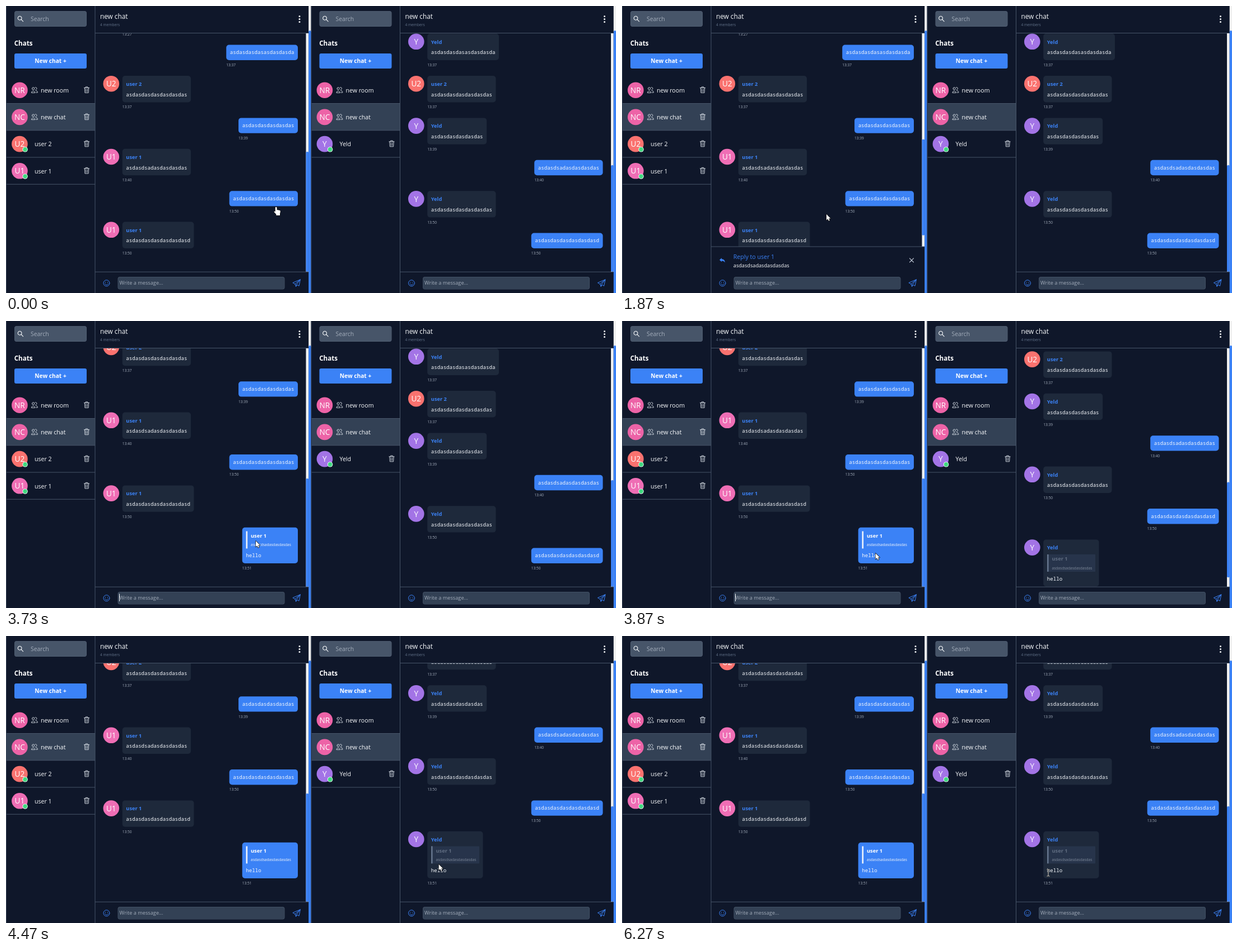
Write an HTML page with a canvas that moves like this. It is 1089 px wide and 514 px high and loops after 6390 ms.

```html
<!DOCTYPE html>
<html lang="en">
<head>
<meta charset="utf-8">
<title>Chat reply</title>
<style>
html, body { margin: 0; width: 100%; height: 100%; overflow: hidden; background: #0f172a; }
canvas { display: block; width: 1089px; height: 514px; }
</style>
</head>
<body>
<canvas id="stage"></canvas>
<script>
const W = 1089, H = 514, LOOP = 6390, FPS = 15;
const canvas = document.getElementById('stage');
const ctx = canvas.getContext('2d');
const dpr = window.devicePixelRatio || 1;
canvas.width = Math.round(W * dpr);
canvas.height = Math.round(H * dpr);

const SANS = '"Open Sans", "Noto Sans", sans-serif';
const MONO = '"Noto Sans Mono", "DejaVu Sans Mono", monospace';
const BG = '#0f172a', LINE = '#475569', ROW = '#334155', CARD = '#1e293b';
const BLUE = '#3b82f6', WHITE = '#f8fafc', MUTED = '#a3adbb', TRACK = '#f1f1f1';
const TOP = 49, BOTTOM = 476, PANEL = 431;

const people = {
  me: { name: 'Yeld', tag: 'Y', color: '#a374e6' },
  u1: { name: 'user 1', tag: 'U1', color: '#ef6eb5' },
  u2: { name: 'user 2', tag: 'U2', color: '#fa726f' }
};
const QUOTE = 'asdasdsadasdasdasdas';
const history = [
  { by: 'u2', text: 'asdasdas', time: '13:27' },
  { by: 'me', text: 'asdasdasdasasdasdasda', time: '13:37' },
  { by: 'u2', text: 'asdasdasdasdasdasdas', time: '13:37' },
  { by: 'me', text: 'asdasdasdasdasdas', time: '13:39' },
  { by: 'u1', text: QUOTE, time: '13:40' },
  { by: 'me', text: 'asdasdasdasdasdasdas', time: '13:50' },
  { by: 'u1', text: 'asdasdasdasdasdasdasd', time: '13:50' }
];
const answer = { by: 'me', text: 'hello', time: '13:51', quote: true };

// Pointer path: time, x, y
const path = [
  [0, 482, 360], [67, 482, 360], [267, 288, 281], [600, 288, 281],
  [1067, 323, 297], [1267, 323, 297], [1600, 365, 373], [3200, 365, 373],
  [3333, 323, 348], [3400, 323, 348], [3733, 446, 394], [3933, 456, 427],
  [4133, 458, 428], [4467, 773, 409], [4600, 836, 402], [4800, 778, 420],
  [5000, 761, 424], [LOOP, 761, 424]
];
const letters = [2000, 2070, 2200, 2330, 2470];
const blinks = [1330, 1870, 2000, 3000, 3530, 4070, 4600, 5200, 5730, 6270];

function rect(x, y, w, h, fill, r = 0) {
  ctx.fillStyle = fill;
  ctx.beginPath();
  ctx.roundRect(x, y, w, h, r);
  ctx.fill();
}

function disc(x, y, r, fill) {
  ctx.fillStyle = fill;
  ctx.beginPath();
  ctx.arc(x, y, r, 0, Math.PI * 2);
  ctx.fill();
}

// y is the middle of the capital letters
function text(s, x, y, size, fill = WHITE, weight = 400, family = SANS, align = 'left') {
  ctx.font = `${weight} ${size}px ${family}`;
  ctx.textAlign = align;
  ctx.fillStyle = fill;
  ctx.fillText(s, x, y + size * 0.36);
}

function icon(d, x, y, color, width = 1, filled = false) {
  ctx.save();
  ctx.translate(x, y);
  const p = new Path2D(d);
  ctx.lineJoin = ctx.lineCap = 'round';
  ctx.lineWidth = width;
  ctx.strokeStyle = ctx.fillStyle = color;
  if (filled) ctx.fill(p); else ctx.stroke(p);
  ctx.restore();
}

const ICONS = {
  search: 'M2 -1.3A3.4 3.4 0 1 1 -4.8 -1.3A3.4 3.4 0 1 1 2 -1.3M1.1 1.2L4.6 4.7',
  group: 'M-4.4 -2.6a2 2.2 0 1 1 4 0a2 2.2 0 1 1 -4 0M-5.6 4.5C-5.6 .8 .8 .8 .8 4.5Z' +
    'M.8 -4.5a2 2.2 0 1 1 1 4M2.2 1C4.3 1 5.4 2.4 5.4 4.5H2.6',
  trash: 'M-4.6 -3.6H4.6M-1.8 -3.6V-5.3H1.8V-3.6M-3.7 -3.6L-3.1 5.3H3.1L3.7 -3.6M-1.4 -1.5L-1.2 3.4M1.4 -1.5L1.2 3.4',
  smile: 'M5.5 0A5.5 5.5 0 1 1 -5.5 0A5.5 5.5 0 1 1 5.5 0M-2.9 1.2C-1.8 3.8 1.8 3.8 2.9 1.2M-2 -1.8V-1.2M2 -1.8V-1.2',
  send: 'M6.6 -6.3L-6.6 -.6L-2.4 1.7L-.9 6L1.3 3.2L4.2 4.8ZM6.6 -6.3L-2.4 1.7M6.6 -6.3L.2 2.6L-.9 6',
  reply: 'M-5 -.7L-1 -4.2V-2.2C3 -2 4.7 0 4.8 4C3.5 1.5 2 .8 -1 .9V2.8Z',
  clip: 'M-4.3 -4H-2V-5.4H2V-4H4.3V5.4H-4.3ZM-2 -4V-2.8H2V-4',
  cross: 'M-3.5 -3.5L3.5 3.5M3.5 -3.5L-3.5 3.5'
};

function avatar(x, y, tag, color, online) {
  disc(x, y, 14.3, color);
  text(tag, x, y + 0.3, 13.6, '#fff', 500, SANS, 'center');
  if (online) {
    disc(x + 9.7, y + 9.8, 4.7, '#fff');
    disc(x + 9.7, y + 9.8, 3.8, '#3fd97f');
  }
}

function sidebar(rows) {
  rect(0, 0, 1, H, '#3b475a');
  rect(15, 9, 129, 28, '#566377', 4);
  rect(15.6, 9.6, 127.8, 26.8, LINE, 3.5);
  icon(ICONS.search, 26, 23, WHITE, 1.1);
  text('Search', 44, 23.2, 10.4, MUTED);
  text('Chats', 14.7, 67, 11.6, '#fff', 700);
  rect(15, 85, 129, 27, BLUE, 3);
  text('New chat +', 79.5, 98.8, 10.2, '#fff', 700, SANS, 'center');
  rows.forEach((r, i) => {
    const top = 126.4 + i * 48.2, mid = top + 24.3;
    if (r.active) rect(1, top, 158, 48.2, ROW);
  });
  rows.forEach((r, i) => {
    const top = 126.4 + i * 48.2, mid = top + 24.3;
    rect(1, top + 47.7, 158, 1, LINE);
    avatar(24.4, mid, r.tag, r.color, !r.room);
    if (r.room) icon(ICONS.group, 51, mid - 0.2, '#dbe1e9', 0.9);
    text(r.name, r.room ? 62 : 51, mid + 0.4, 10.6);
    if (r.bin) icon(ICONS.trash, 144, mid - 0.6, '#dbe1e9', 0.9);
  });
  rect(158.5, 0, 1, H, LINE);
}

function quoteBox(x, y, own) {
  if (!own) rect(x, y, 86, 31, '#27344b', 1);
  rect(x, y, 2.6, 31, own ? '#eef3fb' : '#64748b');
  text('user 1', x + 8.5, y + 8, 9.3, own ? '#fff' : '#5f6c80', 700);
  text(QUOTE, x + 8.5, y + 24.2, 6.6, own ? '#f1f5f9' : '#7f8a9b');
}

function bubble(m, top, own) {
  const pad = own ? 0 : 20, h = boxHeight(m, own);
  ctx.font = `400 9.11px ${MONO}`;
  const w = m.quote ? 99.3 : ctx.measureText(m.text).width + 13.2;
  const x = own ? 521 - w : 207.7;
  rect(x, top, w, h, own ? BLUE : CARD, 5);
  if (!own) {
    const p = people[m.by];
    avatar(187.8, top + 14.2, p.tag, p.color);
    text(p.name, x + 6.6, top + 14.6, 9.25, BLUE, 700);
  }
  if (m.quote) quoteBox(x + 6.8, top + 6.6 + pad, own);
  text(m.text, x + 6.6, top + h - 13.8, 9.11, '#f4f7fb', 400, MONO);
  text(m.time, x, top + h + 8.6, 6.6, MUTED);
}

function boxHeight(m, own) {
  return 27.4 + (own ? 0 : 20) + (m.quote ? 36.8 : 0);
}

function feed(list, self, lag, bottom) {
  ctx.save();
  ctx.beginPath();
  ctx.rect(159.5, TOP, 376, bottom - TOP);
  ctx.clip();
  let y = 462 + lag;
  for (let i = list.length - 1; i >= 0 && y > TOP - 20; i--) {
    const own = list[i].by === self;
    y -= boxHeight(list[i], own) + 28;
    bubble(list[i], y, own);
  }
  ctx.restore();
}

function scrollbar(content, lag, bottom) {
  const view = bottom - TOP;
  const scroll = content - (BOTTOM - TOP) - lag;
  rect(535.5, TOP, 4.7, view, TRACK);
  rect(535.5, TOP + scroll / content * view, 4.7, view * view / content, BLUE, 2);
}

function header() {
  text('new chat', 168, 19, 11.8);
  text('4 members', 168, 33.6, 6.6, '#64748b');
  for (let i = 0; i < 3; i++) disc(524, 18.6 + i * 5, 1.5, WHITE);
  rect(159, 48, 381, 1, LINE);
}

function composer(typed, caret, replying) {
  if (!replying) rect(159, 475.7, 381, 1, LINE);
  icon(ICONS.smile, 179.5, 496.3, BLUE, 1);
  rect(199.5, 485, 298, 22.6, LINE, 4);
  rect(200.2, 485.7, 296.6, 21.2, ROW, 3.5);
  text(typed || 'Write a message...', 202.5, 495.8, 9.2, typed ? WHITE : MUTED);
  if (caret) {
    const x = typed ? 202.5 + ctx.measureText(typed).width : 202;
    rect(x, 488.5, 1, 13.5, WHITE);
  }
  icon(ICONS.send, 518.5, 496.3, BLUE, 1);
}

function replyPanel() {
  rect(159, PANEL - 0.5, 381, 1, LINE);
  icon(ICONS.reply, 179, 455.5, BLUE, 1, true);
  text('Reply to user 1', 198.8, 449, 10.6, BLUE);
  text(QUOTE, 198.8, 464.6, 9.17);
  icon(ICONS.cross, 517, 455.3, '#cbd5e1', 1.1);
}

function menu(hover) {
  rect(287.4, 280.8, 117.6, 48.4, '#2b3566', 1);
  rect(288.2, 281.6, 116, 46.8, '#11164a');
  if (hover) rect(288.2, 281.6, 116, 23, '#272b54');
  icon(ICONS.reply, 302, 293, '#b9c0d0', 1, true);
  text('Reply', 315, 293.6, 9.4, '#cfd5e2');
  icon(ICONS.clip, 302, 316.5, '#b9c0d0', 0.9);
  text('Copy To Clipboard', 315, 317, 9.4, '#cfd5e2');
}

function pointAt(t) {
  const i = Math.max(1, path.findIndex(p => p[0] >= t));
  const [t0, x0, y0] = path[i - 1], [t1, x1, y1] = path[i];
  const k = Math.min(1, Math.max(0, (t - t0) / (t1 - t0)));
  return [x0 + (x1 - x0) * k, y0 + (y1 - y0) * k];
}

function pointer(x, y, kind) {
  const shapes = {
    arrow: 'M0 0V10.4L2.4 8.2L4 11.8L5.8 11L4.2 7.5H7.4Z',
    hand: 'M0 0C1.2 -.2 1.6 .6 1.6 1.6V5L6.4 6C7.6 6.4 8 7 7.8 8.4L7 12V15H.4V13L-3.2 9.2' +
      'C-4 8 -2.6 7.2 -1.6 8L-1.2 8.4V1.4C-1.2 .5 -.8 0 0 0Z'
  };
  if (kind === 'beam') {
    const d = 'M-2.2 -5.8H-.6L0 -5.2L.6 -5.8H2.2M0 -5.2V5.4M-2.2 6H-.6L0 5.4L.6 6H2.2';
    icon(d, x, y, '#111', 2);
    icon(d, x, y, '#e8e8e8', 1);
    return;
  }
  icon(shapes[kind], x, y, '#111', 1.4);
  icon(shapes[kind], x, y, '#fff', 1, true);
}

const rooms = [
  { name: 'new room', tag: 'NR', color: '#ed63a7', room: true },
  { name: 'new chat', tag: 'NC', color: '#ed63a7', room: true, active: true }
];
const contact = id => ({ ...people[id], bin: true });
const leftRows = [...rooms.map(r => ({ ...r, bin: true })), contact('u2'), contact('u1')];
const rightRows = [...rooms, contact('me')];

function windowBar() {
  rect(540.2, 0, 4.4, 46, TRACK);
  rect(540.2, 44, 4.4, H - 44, BLUE, [2, 2, 0, 0]);
}

function draw(now) {
  const t = Math.floor(now * FPS / 1000 + 0.1) * 1000 / FPS;
  const after = ms => t + 5 >= ms;
  const sent = after(2800), got = after(3800);
  const replying = after(1270) && !sent;
  const typed = sent ? '' : 'hello'.slice(0, letters.filter(after).length);
  const caret = blinks.filter(after).length % 2 === 1;
  const bottom = replying ? PANEL : BOTTOM;
  const p = Math.min(1, Math.max(0, (t - 3800) / 270));
  const lag = got ? 112.2 * Math.pow(1 - p, 3.5) : 0;
  const longer = [...history, answer];

  ctx.setTransform(dpr, 0, 0, dpr, 0, 0);
  rect(0, 0, W, H, BG);

  sidebar(leftRows);
  header();
  feed(sent ? longer : history, 'me', 0, bottom);
  scrollbar(sent ? 940 : 848, 0, bottom);
  if (replying) replyPanel();
  composer(typed, caret, replying);
  windowBar();

  ctx.save();
  ctx.translate(544.5, 0);
  sidebar(rightRows);
  header();
  feed(got ? longer : history, 'u1', lag, BOTTOM);
  scrollbar(got ? 1067 : 955, lag, BOTTOM);
  composer('', false, false);
  windowBar();
  ctx.restore();

  const [x, y] = pointAt(t);
  const open = after(600) && !after(1270);
  const hover = open && x > 290;
  if (open) menu(hover);
  const kind = !after(70) || hover ? 'hand' : after(5000) ? 'beam' : 'arrow';
  pointer(x, y, kind);
}

const start = performance.now();
function tick() {
  draw((performance.now() - start) % LOOP);
  requestAnimationFrame(tick);
}
tick();
</script>
</body>
</html>
```
